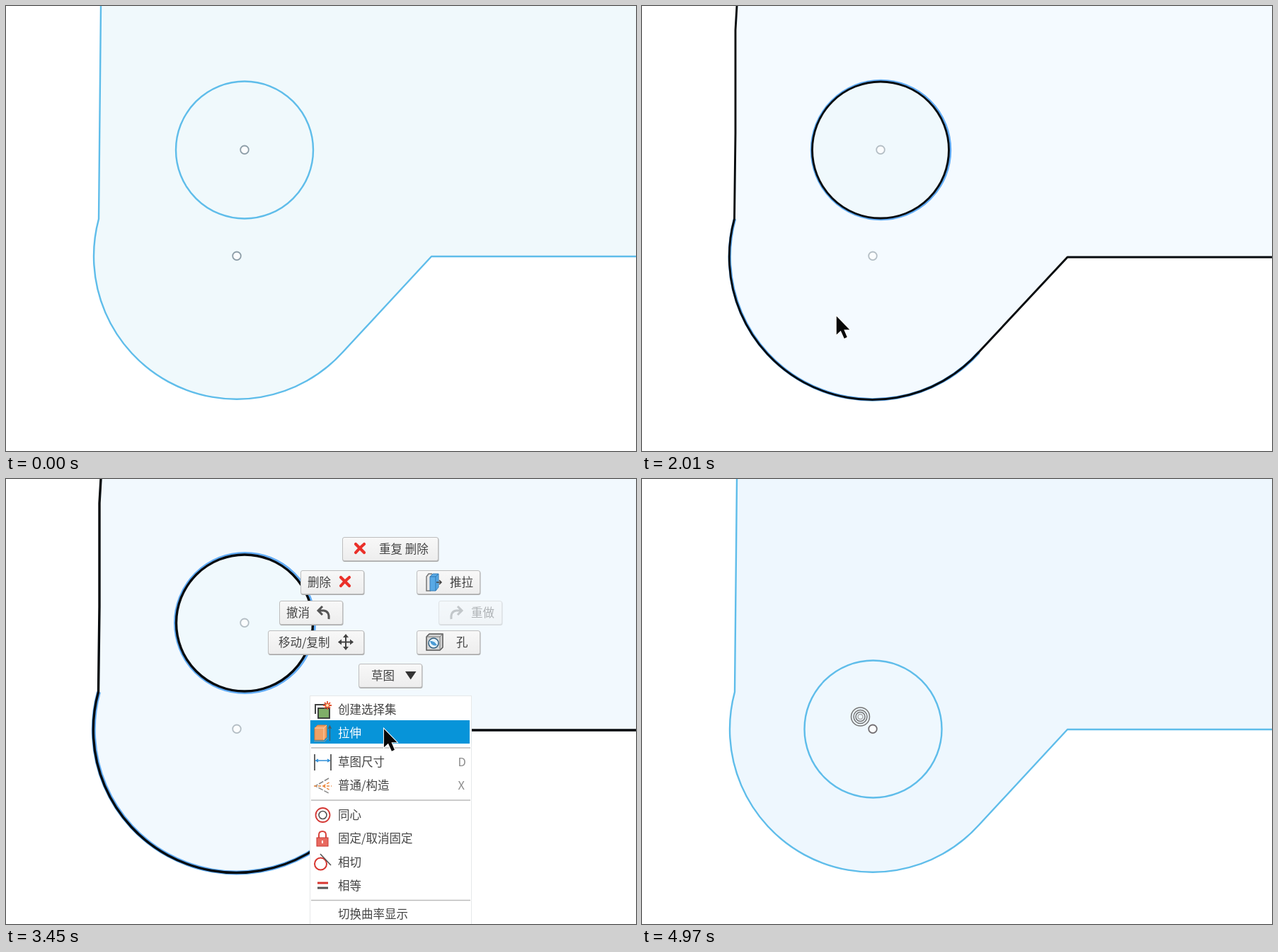
An HTML page for the animation above (5.37 s loop, 890x629 px).

```html
<!DOCTYPE html>
<html lang="zh-CN">
<meta charset="utf-8">
<style>
  html, body { margin: 0; width: 100%; height: 100%; overflow: hidden; background: #fff; }
  svg { display: block; width: 890px; height: 629px; }
  text { font: 300 16.5px "Noto Sans CJK SC", "Noto Sans CJK", sans-serif; fill: #444; }
  .key { fill: #8c8c8c; }
  .hot text { fill: #fff; }
  .bar { fill: #0794d9; visibility: hidden; }
  .hot .bar { visibility: visible; }
  .line { fill: none; }
  .halo { fill: none; stroke: #62acf6; }
</style>
<svg viewBox="0 0 890 629">
  <defs>
    <linearGradient id="face" x2="0" y2="1">
      <stop stop-color="#f8f8f8"/><stop offset="1" stop-color="#ededed"/>
    </linearGradient>
    <path id="cross" d="M-6-6Q0 0 6 6M6-6Q0-1-6 6" fill="none" stroke="#ea3029" stroke-width="4.2" stroke-linecap="round"/>
  </defs>
  <path id="fill"/>
  <path id="arcHalo" class="halo" d="M131 301A202 202 0 0 0 476 489.500"/>
  <path id="edge" class="line" stroke-linejoin="round"/>
  <g id="hole">
    <circle id="holeHalo" class="halo" cx=".5" r="97.500"/>
    <circle id="ring"/>
  </g>
  <g id="points" fill="#fbfdfe" stroke-width="1.8">
    <circle id="oldPoint" cx="337" cy="203.300" r="5.8"/>
    <circle cx="326" cy="353.300" r="5.8"/>
  </g>
  <g id="badge" class="line" stroke="#777" stroke-width="1.5">
    <circle cx="308.500" cy="336" r="13"/><circle cx="308.500" cy="336" r="9.500"/>
    <circle cx="308.500" cy="336" r="6.500"/><circle cx="308.500" cy="336" r="3.500" stroke="#aaa"/>
  </g>
  <g id="menu"></g>
  <ellipse id="trail" cx="543" cy="205" rx="2" ry="17" fill="#8c959a" opacity=".6"/>
  <path id="cursor" d="M0 0V26L6 20.500L11 31.500L15 29.500L10.500 19H18.500Z" fill="#080808" stroke="#fff" stroke-width="2" paint-order="stroke"/>
</svg>
<script>
const LOOP = 5370, BLACK = 130, PICK_HOLE = 1000, PICK_ARC = 1880, OPEN = 2660, MOVE = 3240, APPLY = 4160, LEAVE = 4970;
const $ = id => document.getElementById(id);
const set = (id, attrs) => { for (const k in attrs) $(id).setAttribute(k, attrs[k]); };
const show = (id, on) => $(id).setAttribute('visibility', on ? 'visible' : 'hidden');

// Dark lines sit on whole pixels, so the steep side bends and the ledge drops slightly.
const outline = (side, ledge) => `M134 0L${side} 301A202 202 0 0 0 476 489L601 ${ledge}H892`;
const thinOutline = outline('131', 354), darkOutline = outline('132 34L132 180L130.500', 355);
set('fill', { d: thinOutline + 'V0Z' });

// x, y, width, label, label x, icon
const buttons = [
  [475, 82, 136, '重复 删除', 527, '<use href="#cross" x="500" y="98"/>'],
  [416, 129, 90, '删除', 426, '<use href="#cross" x="479" y="145"/>'],
  [580, 129, 90, '推拉', 627, `<path d="M602 134H597L594 138V158H600" fill="#e8e8e8" stroke="#777" stroke-width="1.500"/>
    <path d="M599 138L603 134H611V153L607 158H599Z" fill="#58a9e5" stroke="#397fb7"/><path d="M599 138H607V158M607 138L611 134" class="line" stroke="#2f77b2"/>
    <path d="M608 146H615M612 143L615 146L612 149" class="line" stroke="#444" stroke-width="1.500"/>`],
  [386, 172, 90, '撤消', 396, '<path d="M447 180L441 186L447 192M442 186H449Q457 187 456 198" class="line" stroke="#555" stroke-width="3"/>'],
  [611, 172, 90, '重做', 657, '<path d="M638 180L644 186L638 192M643 186H636Q628 187 629 198" class="line" stroke="#777" stroke-width="3"/>'],
  [370, 214, 136, '移动/复制', 385, `<path d="M480 221V240M470 230.500H490" stroke="#444" stroke-width="2"/>
    <path d="M480 219L484 224H476ZM480 242L484 237H476ZM469 230.500L474 226.500V234.500ZM491 230.500L486 226.500V234.500Z" fill="#444"/>`],
  [580, 214, 90, '孔', 636, `<path d="M594 223L598 219H617V238L613 242H594Z" fill="#d5d5d5" stroke="#555" stroke-width="1.500"/>
    <path d="M594 223H613V242M613 223L617 219" class="line" stroke="#777"/><circle cx="604" cy="232" r="7" fill="#e7f3fb" stroke="#315f80" stroke-width="1.500"/>
    <path d="M599 229Q601 237 609 235Q605 228 599 229" fill="#4a9bd5"/>`],
  [498, 261, 90, '草图', 516, '<path d="M564 272H579.500L571.700 283.500Z" fill="#333"/>']
];

// centre y, label, shortcut, icon
const rows = [
  [326, '创建选择集', '', `<path d="M437 332V319H451" class="line" stroke="#444" stroke-width="2"/><rect x="441" y="324" width="16" height="14" fill="#7fae68" stroke="#333" stroke-width="1.800"/>
    <path d="M454 314V326M448 320H460M450 316L458 324M458 316L450 324" stroke="#e2522d" stroke-width="1.800"/><circle cx="454" cy="320" r="2" fill="#ffe7b0"/>`],
  [359, '拉伸', '', `<path d="M436 352L440 348H453V365L449 369H436Z" fill="#f0a166" stroke="#db7c37"/><path d="M436 352H449V369M449 352L453 348" class="line" stroke="#ffd0a8"/>
    <path d="M435 371H450L455 366" class="line" stroke="#999"/><path d="M457.500 370V350M455.500 353L457.500 349L459.500 353" class="line" stroke="#555" stroke-width="1.200"/>`],
  [400, '草图尺寸', 'D', `<path d="M436 389V412M459 389V412" stroke="#555" stroke-width="1.800"/>
    <path d="M437 398H458M441 396L438 398L441 400M454 396L457 398L454 400" class="line" stroke="#2f8fd8" stroke-width="1.500"/>`],
  [433, '普通/构造', 'X', `<path d="M456 423L437 434L456 444" class="line" stroke="#888" stroke-width="1.500" stroke-dasharray="7 2"/>
    <path d="M435 434H460M448 434L458 428M448 434L458 440" stroke="#ec8c43" stroke-width="1.500" stroke-dasharray="4 2"/>`],
  [475, '同心', '', `<circle cx="447.500" cy="475" r="10" class="line" stroke="#d53a36" stroke-width="1.800"/><circle cx="447.500" cy="475" r="5.500" class="line" stroke="#555" stroke-width="1.600"/>`],
  [508, '固定/取消固定', '', `<path d="M442 508V503Q442 498 447 498Q452 498 452 503V508" class="line" stroke="#d8443c" stroke-width="2"/>
    <rect x="439" y="507" width="16" height="12" fill="#e86a60" stroke="#c93630"/><path d="M447 511V515" stroke="#fff" stroke-width="2"/>`],
  [542, '相切', '', `<circle cx="444.500" cy="544" r="8.500" class="line" stroke="#d8352f" stroke-width="2"/><path d="M444 530L459 546" stroke="#555" stroke-width="1.600"/>`],
  [575, '相等', '', '<path d="M440 571H455" stroke="#d8352f" stroke-width="3"/><path d="M440 578H455" stroke="#555" stroke-width="3"/>'],
  [615, '切换曲率显示', '', '']
];

const buttonMarkup = ([x, y, w, label, tx, icon]) => `<g opacity="${label === '重做' ? .38 : 1}">
  <rect x="${x + .5}" y="${y + 1}" width="${w}" height="34" rx="3" fill="#aaa"/>
  <rect x="${x + .5}" y="${y + .5}" width="${w - 1}" height="33" rx="2.500" fill="url(#face)" stroke="#bebebe"/>
  ${icon}<text x="${tx}" y="${y + 22.500}">${label}</text></g>`;
const rowMarkup = ([y, label, key, icon]) => `<g class="row"><rect class="bar" x="430" y="${y - 18}" width="225" height="33"/>
  ${icon}<text x="469" y="${y + 6}">${label}</text><text class="key" x="638.500" y="${y + 6}">${key}</text></g>`;
$('menu').innerHTML = buttons.map(buttonMarkup).join('') +
  '<rect x="429.500" y="306.500" width="228" height="330" fill="#fff" stroke="#e6e8e9"/>' +
  rows.map(rowMarkup).join('') +
  '<path d="M431 380H656M431 454H656M431 595.500H656" stroke="#bbb" stroke-width="1.500"/>';
const rowNodes = [...document.querySelectorAll('.row')];

// Pointer path: time, x, y
const path = [
  [130, 655, 565], [400, 515, 470], [610, 378, 342], [750, 356, 310], [900, 346, 299], [1250, 346, 299],
  [1420, 222, 493], [1550, 188, 499], [1880, 188, 499], [2410, 539, 254], [2500, 539, 254],
  [2610, 543, 188], [3239, 543, 188], [3240, 543, 288], [3300, 543, 288], [3700, 519, 461], [3780, 519, 461],
  [3900, 509, 476], [4560, 509, 476], [4700, 560, 506], [4800, 655, 548], [4970, 787, 630]
];
function pointer(t) {
  const i = Math.max(1, path.findIndex(p => p[0] >= t));
  const [t0, x0, y0] = path[i - 1], [t1, x1, y1] = path[i];
  const k = (t - t0) / (t1 - t0);
  return [x0 + (x1 - x0) * k, y0 + (y1 - y0) * k];
}

function draw(t) {
  const black = t >= BLACK && t < APPLY, open = t >= OPEN && t < APPLY, done = t >= APPLY;
  const stroke = black ? '#070b0e' : '#5fbdea', width = !black ? 2.4 : open ? 3.4 : 2.9;
  const tint = done ? '#eef7fe' : open ? '#f2f9fe' : t >= PICK_HOLE ? '#f4faff' : black ? '#f2fbfd' : '#f0f9fc';
  const inner = done ? '#eff8fe' : black ? '#f0f9fd' : '#f0f9fc';
  set('fill', { fill: tint });
  set('edge', { d: black ? darkOutline : thinOutline, stroke, 'stroke-width': width });
  set('ring', { r: black ? 96.5 : 97, stroke, 'stroke-width': width, fill: inner });
  set('hole', { transform: done ? 'translate(326.500 353.500)' : 'translate(337 203.500)' });
  set('points', { stroke: done ? '#716d70' : black ? '#b3bdc4' : '#8b9ca6' });
  show('oldPoint', !done);
  show('badge', done);
  for (const [id, picked] of [['holeHalo', PICK_HOLE], ['arcHalo', PICK_ARC]]) {
    show(id, black && t >= picked);
    set(id, { 'stroke-width': open ? 6 : 4.5 });
  }
  $('menu').style.display = open ? '' : 'none';
  show('trail', t >= MOVE && t < MOVE + 110);
  const visible = t >= BLACK && t < LEAVE;
  show('cursor', visible);
  if (!visible) return;
  const [x, y] = pointer(t);
  set('cursor', { transform: `translate(${x} ${y})` });
  rowNodes.forEach((node, i) => node.classList.toggle('hot', open && Math.abs(y - rows[i][0]) < 16.5));
}

const start = performance.now();
function frame() {
  draw((performance.now() - start) % LOOP);
  requestAnimationFrame(frame);
}
frame();
</script>
</html>
```
